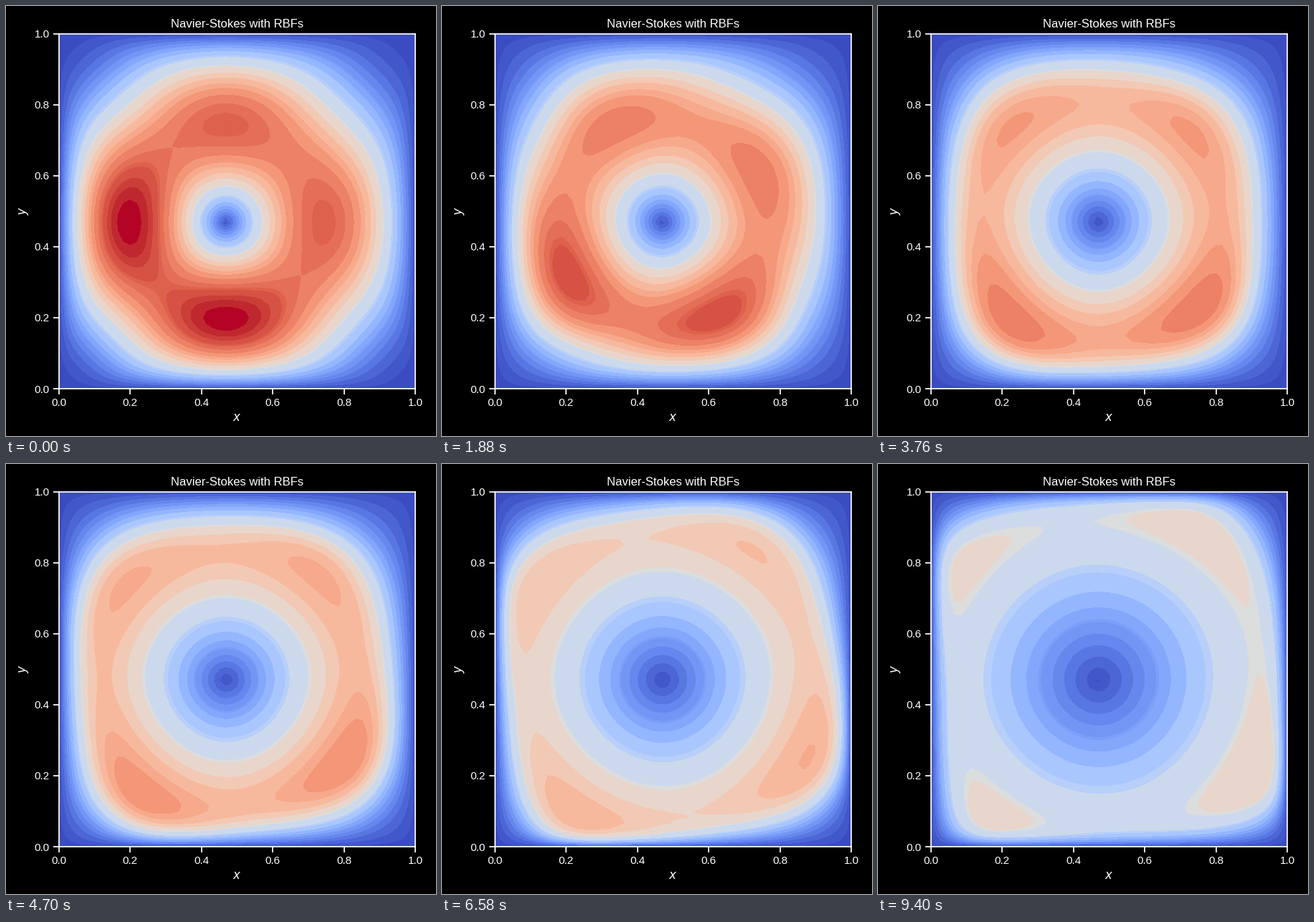
Recreate the animation shown at these times as a matplotlib script. Size 600 px wide and 600 px high, loop 9870 ms.

```python
import numpy as np
import matplotlib.pyplot as plt
from matplotlib.animation import FuncAnimation

FRAMES = 21
INTERVAL = 470
N = 120            # grid cells per side
NU = 0.01          # viscosity
DT = 0.002
STEPS = 20         # solver steps per frame
STRIDE = 2         # plotted grid is coarser than the solver grid

EDGES = [0, 0.012, 0.042, 0.08, 0.118, 0.157, 0.196, 0.206, 0.245, 0.297,
         0.36, 0.385, 0.49, 0.506, 0.58, 0.635, 0.69, 0.73, 0.78, 0.83,
         0.865, 0.88, 0.92, 0.95, 0.982, 1.1]

plt.rcParams.update({
    "font.family": "Liberation Sans",
    "mathtext.fontset": "dejavusans",
    "text.color": "white",
    "axes.labelcolor": "white",
    "axes.edgecolor": "white",
    "xtick.color": "white",
    "ytick.color": "white",
})


def bump(z):
    """Profile of the stream function and its derivative."""
    a = 0.8 * np.pi
    g = 1 - np.cos(a * z)
    return g * (1 - z) ** 2, a * np.sin(a * z) * (1 - z) ** 2 - 2 * g * (1 - z)


def rate(w):
    """Advection and diffusion with fixed walls; w holds (u, v)[y, x]."""
    h = 1 / N
    mid = w[:, 1:-1, 1:-1]
    east, west = w[:, 1:-1, 2:], w[:, 1:-1, :-2]
    north, south = w[:, 2:, 1:-1], w[:, :-2, 1:-1]
    out = np.zeros_like(w)
    out[:, 1:-1, 1:-1] = (
        NU * (east + west + north + south - 4 * mid) / h ** 2
        - mid[0] * (east - west) / (2 * h)
        - mid[1] * (north - south) / (2 * h))
    return out


def step(w):
    k1 = rate(w)
    k2 = rate(w + DT / 2 * k1)
    k3 = rate(w + DT / 2 * k2)
    k4 = rate(w + DT * k3)
    return w + DT / 6 * (k1 + 2 * k2 + 2 * k3 + k4)


def solve():
    f, df = bump(np.linspace(0, 1, N + 1))
    w = 10 * np.array([np.outer(df, f), -np.outer(f, df)])
    w[:, [0, -1], :] = 0
    w[:, :, [0, -1]] = 0
    speeds = []
    for _ in range(FRAMES):
        speeds.append(np.hypot(w[0], w[1])[::STRIDE, ::STRIDE])
        for _ in range(STEPS):
            w = step(w)
    return speeds


speeds = solve()
axis = np.linspace(0, 1, N // STRIDE + 1)
mids = [(a + b) / 2 for a, b in zip(EDGES, EDGES[1:])]
mids[0], mids[-1] = 0.0, 1.0
colors = plt.get_cmap("coolwarm")(mids)

fig = plt.figure(figsize=(6, 6), dpi=100, facecolor="black")
ax = fig.add_axes([74 / 600, 66 / 600, 497 / 600, 495.5 / 600],
                  facecolor="black")
ax.set_xlim(0, 1)
ax.set_ylim(0, 1)
ax.set_title("Navier-Stokes with RBFs", fontsize=12)
ax.set_xlabel("$x$", fontsize=12)
ax.set_ylabel("$y$", fontsize=12)
ax.tick_params(length=6, width=1.25, labelsize=11)
for spine in ax.spines.values():
    spine.set_linewidth(1.25)

shown = []


def draw(i):
    while shown:
        shown.pop().remove()
    shown.append(ax.contourf(axis, axis, speeds[i], levels=EDGES,
                             colors=colors))
    return shown


anim = FuncAnimation(fig, draw, frames=FRAMES, init_func=lambda: draw(0),
                     interval=INTERVAL, repeat=True, repeat_delay=0)
plt.show()
```
